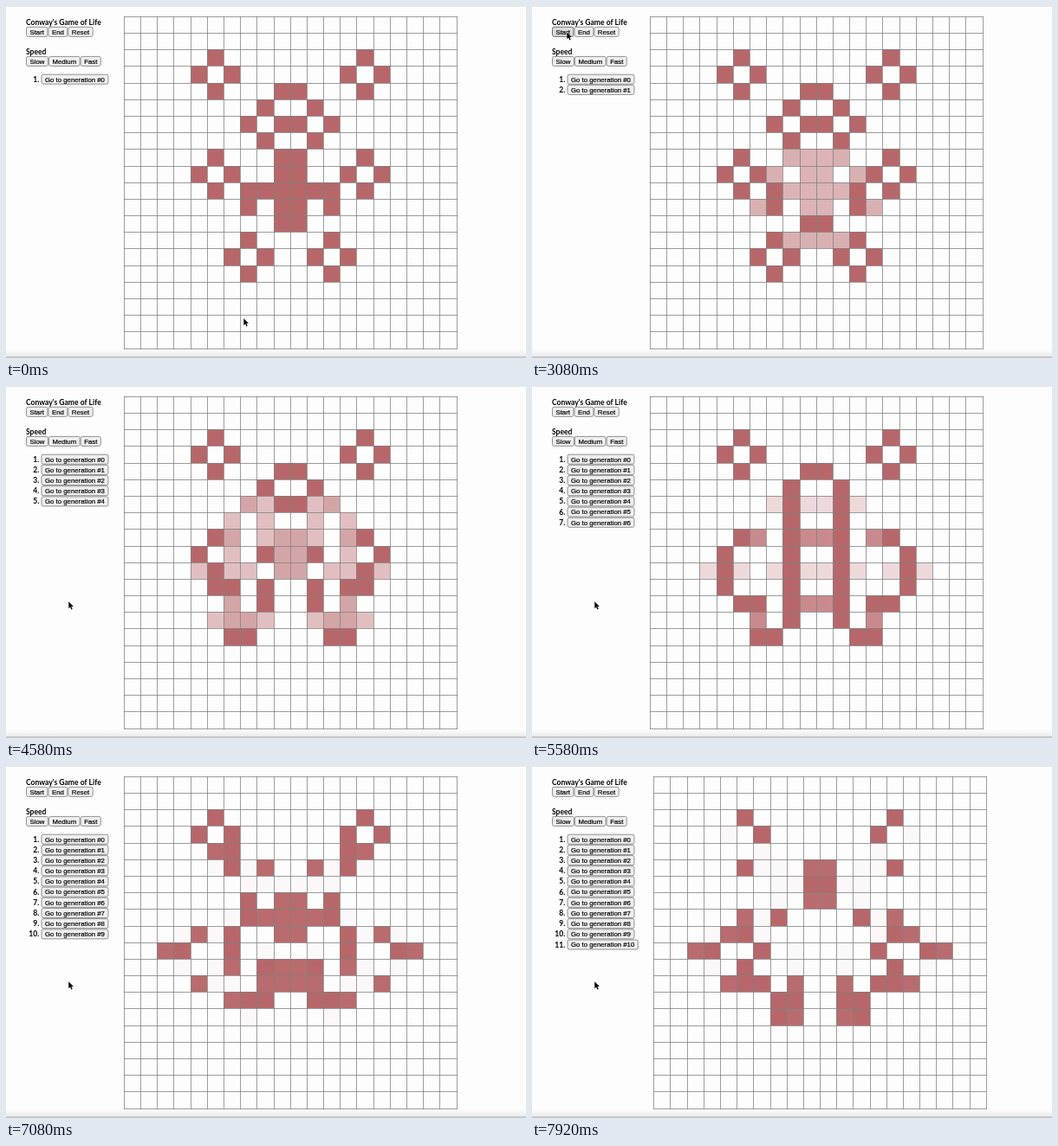
These frames come from a looping animation (600 by 407 pixels, 8000 ms). An HTML page with a canvas:

```html
<!DOCTYPE html>
<html lang="en">
<head>
<meta charset="utf-8">
<title>Conway's Game of Life</title>
<style>
html, body { margin: 0; width: 100%; height: 100%; overflow: hidden; background: #fefdfe; }
canvas { display: block; }
</style>
</head>
<body>
<canvas id="stage" width="600" height="407"></canvas>
<script>
const ctx = document.getElementById('stage').getContext('2d');
const LOOP = 8000, FADE = 500, SIZE = 20, CELL = 19.18, LEFT = 135.95, TOP = 11.95;

// Left half of rows 2 to 15; the right half is its mirror image.
const seed = [
  '.....#....', '....#.#...', '.....#...#', '........#.', '.......#.#',
  '........#.', '.....#...#', '....#.#..#', '.....#.###', '.......#.#',
  '.........#', '.......#..', '......#.#.', '.......#..'
];
// Moment at which each generation after the first appears.
const ticks = [2932, 3439, 3946, 4454, 4974, 5493, 6003, 6530, 7057, 7540];

const range = n => [...Array(n).keys()];
const firstGrid = range(SIZE).map(row => range(SIZE).map(col =>
  +(seed[row - 2]?.[Math.min(col, SIZE - 1 - col)] === '#')));

function nextGrid(grid) {
  return grid.map((line, row) => line.map((alive, col) => {
    let sum = -alive;
    for (let dr = -1; dr <= 1; dr++)
      for (let dc = -1; dc <= 1; dc++) sum += grid[row + dr]?.[col + dc] || 0;
    return +(sum === 3 || (alive && sum === 2));
  }));
}

const generations = [firstGrid];
ticks.forEach(() => generations.push(nextGrid(generations.at(-1))));

// The CSS "ease" curve, cubic-bezier(.25, .1, .25, 1).
function ease(x) {
  if (x >= 1) return 1;
  const bezier = (a, b, s) => 3 * a * s * (1 - s) ** 2 + 3 * b * s * s * (1 - s) + s ** 3;
  let low = 0, high = 1;
  for (let i = 0; i < 20; i++) {
    const mid = (low + high) / 2;
    if (bezier(.25, .25, mid) < x) low = mid; else high = mid;
  }
  return bezier(.1, 1, low);
}

// Pointer stops: time, x, y
const pointerPath = [
  [40, 274, 361], [850, 43, 58], [1250, 35, 34], [1380, 35, 34], [1580, 34, 30],
  [2460, 34, 30], [2670, 40, 30], [3400, 40, 30], [3780, 52, 70], [4400, 72, 249]
];

function pointerAt(time) {
  const i = pointerPath.findIndex(stop => stop[0] > time);
  if (i === 0) return pointerPath[0].slice(1);
  if (i < 0) return pointerPath.at(-1).slice(1);
  const [t0, x0, y0] = pointerPath[i - 1], [t1, x1, y1] = pointerPath[i];
  const k = (time - t0) / (t1 - t0), s = k * k * (3 - 2 * k);
  return [x0 + (x1 - x0) * s, y0 + (y1 - y0) * s];
}

function label(text, x, baseline, align = 'left') {
  ctx.font = '700 8.55px Lato, sans-serif';
  ctx.textAlign = align;
  ctx.fillStyle = '#000';
  ctx.fillText(text, x, baseline);
}

// Draws a button around its vertical middle and returns its right edge.
function button(text, x, middle, pressed = false) {
  ctx.font = '7.8px "Liberation Sans", Arial, sans-serif';
  ctx.textAlign = 'left';
  const width = ctx.measureText(text).width + 9;
  ctx.beginPath();
  ctx.roundRect(x + .5, middle - 5.5, width - 1, 11, 2);
  ctx.fillStyle = pressed ? '#dcdcdc' : '#efefef';
  ctx.fill();
  ctx.lineWidth = .9;
  ctx.strokeStyle = pressed ? '#606060' : '#858585';
  ctx.stroke();
  // A hairline outline gives the text its slightly heavy look.
  ctx.lineWidth = .2;
  ctx.fillStyle = ctx.strokeStyle = '#000';
  ctx.fillText(text, x + 4.5, middle + 2.8);
  ctx.strokeText(text, x + 4.5, middle + 2.8);
  return x + width;
}

function drawPanel(count, pressed) {
  label("Conway's Game of Life", 23, 21.5);
  ['Start', 'End', 'Reset'].reduce((x, text) => button(text, x, 29.8, pressed && text === 'Start'), 23);
  label('Speed', 23, 55.5);
  ['Slow', 'Medium', 'Fast'].reduce((x, text) => button(text, x, 63.9), 23);
  for (let i = 0; i <= count; i++) {
    const middle = 84.7 + 12.18 * i;
    label(`${i + 1}.`, 38.3, middle + 3, 'right');
    button(`Go to generation #${i}`, 40.5, middle);
  }
}

function drawGrid(left, before, after, progress) {
  const edge = (start, i) => Math.round(start + CELL * i);
  for (let row = 0; row < SIZE; row++) {
    for (let col = 0; col < SIZE; col++) {
      const alpha = before[row][col] * (1 - progress) + after[row][col] * progress;
      if (!alpha) continue;
      const x = edge(left, col), y = edge(TOP, row);
      ctx.fillStyle = `rgba(183, 103, 106, ${alpha})`;
      ctx.fillRect(x, y, edge(left, col + 1) - x, edge(TOP, row + 1) - y);
    }
  }
  ctx.beginPath();
  for (let i = 0; i <= SIZE; i++) {
    const x = edge(left, i) + .5, y = edge(TOP, i) + .5;
    ctx.moveTo(x, edge(TOP, 0));
    ctx.lineTo(x, edge(TOP, SIZE) + 1);
    ctx.moveTo(edge(left, 0), y);
    ctx.lineTo(edge(left, SIZE) + 1, y);
  }
  ctx.lineWidth = 1;
  ctx.strokeStyle = 'rgba(128, 128, 128, .77)';
  ctx.stroke();
}

function drawPage() {
  ctx.fillStyle = '#fefdfe';
  ctx.fillRect(0, 0, 600, 407);
  ctx.fillStyle = '#e6e6e6';
  ctx.fillRect(0, 0, 600, 1);
  const shade = ctx.createLinearGradient(0, 397, 0, 406);
  shade.addColorStop(0, 'rgba(0, 0, 0, 0)');
  shade.addColorStop(1, 'rgba(0, 0, 0, .08)');
  ctx.fillStyle = shade;
  ctx.fillRect(0, 397, 600, 9);
  ctx.fillStyle = '#c8c8c8';
  ctx.fillRect(0, 405, 600, 2);
}

const arrow = new Path2D('M0 0V7.9L1.8 6.2L3.1 9.1L4.4 8.5L3.1 5.7H5.6Z');

function drawPointer(x, y) {
  ctx.save();
  ctx.translate(x + .3, y + .3);
  ctx.lineWidth = 1;
  ctx.strokeStyle = '#fff';
  ctx.stroke(arrow);
  ctx.fillStyle = '#000';
  ctx.fill(arrow);
  ctx.restore();
}

function draw(now) {
  const time = now % LOOP;
  const count = ticks.filter(tick => tick <= time).length;
  const progress = count ? ease((time - ticks[count - 1]) / FADE) : 1;
  // The two-digit button widens the panel and pushes the grid aside.
  const left = count > 9 ? LEFT + 4.3 : LEFT;

  drawPage();
  drawGrid(left, generations[Math.max(count - 1, 0)], generations[count], progress);
  drawPanel(count, time >= 2500 && time < 3600);
  drawPointer(...pointerAt(time));
}

function frame() {
  draw(performance.now());
  requestAnimationFrame(frame);
}
frame();
</script>
</body>
</html>
```
